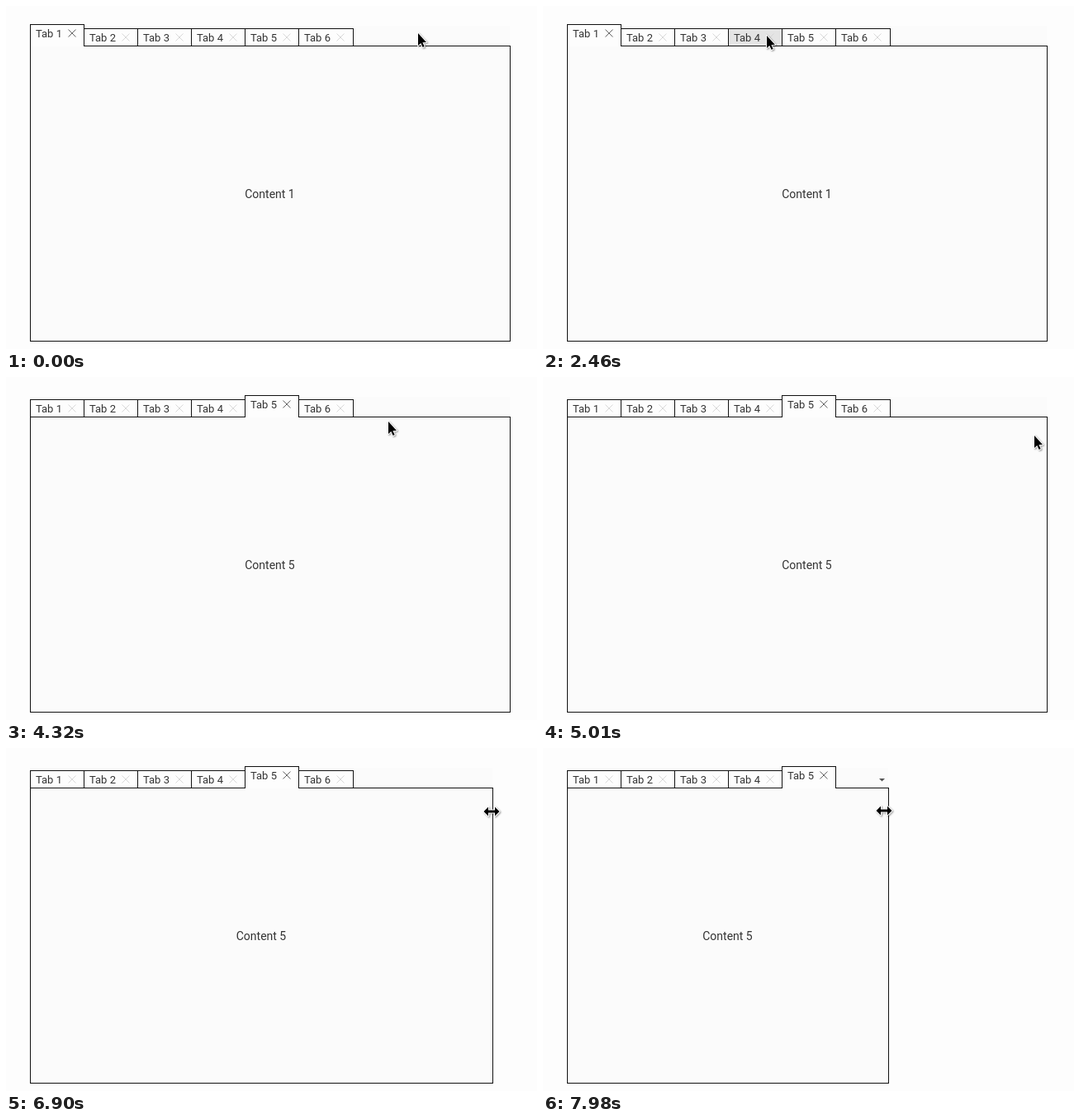
An HTML page with a canvas for the animation above (8000 ms loop, 643 px wide and 416 px high).

```html
<!DOCTYPE html>
<html lang="en">
<head>
<meta charset="utf-8">
<title>Tabs</title>
<style>
  html, body { margin: 0; width: 100%; height: 100%; overflow: hidden; background: #fdfdfd; }
  canvas { display: block; width: 643px; height: 416px; }
</style>
</head>
<body>
<canvas id="stage" width="643" height="416"></canvas>
<script>
const ctx = document.getElementById('stage').getContext('2d');
const LOOP = 8000, CLICK = 3150, RAISE = 200, GRAB = 6000, DRAG = 6510, LAG = 38;
const LEFT = 29, TAB_TOP = 27, TOP = 48, BOTTOM = 406, PITCH = 65.17, TABS = 6;
const PAGE = '#fdfdfd', PANEL = '#fbfbfb', LINE = '#111', HOVER = '#e4e4e4', TEXT = '#333';

const clamp = v => Math.max(0, Math.min(1, v));
const smooth = v => v * v * (3 - 2 * v);
const power = p => v => v ** p;
const tabX = i => Math.floor(LEFT + i * PITCH);

// Pointer strokes from the start point; it rests in between
const start = { x: 499, y: 34 };
const strokes = [
  { from: 150, to: 2220, x: 270, y: 37, ease: power(1.4) },
  { from: 2430, to: 2880, x: 324, y: 36, ease: smooth },
  { from: 3420, to: 5250, x: 608, y: 74, ease: smooth },
  { from: 5550, to: 5700, x: 610, y: 75, ease: smooth },
  { from: 5910, to: 6060, x: 613, y: 77, ease: smooth },
  { from: DRAG, to: LOOP, x: 409, y: 76, ease: power(1.57) }
];

function pointerAt(t) {
  let { x, y } = start;
  for (const s of strokes) {
    const k = s.ease(clamp((t - s.from) / (s.to - s.from)));
    x += (s.x - x) * k;
    y += (s.y - y) * k;
  }
  return { x, y };
}

function rect(x, y, w, h, color) {
  ctx.fillStyle = color;
  ctx.fillRect(x, y, w, h);
}

function poly(points, dx, dy) {
  ctx.beginPath();
  points.forEach(([x, y]) => ctx.lineTo(x + dx, y + dy));
  ctx.closePath();
}

function label(text, x, y, size, align) {
  ctx.font = size + 'px Roboto, sans-serif';
  ctx.textAlign = align;
  ctx.fillStyle = TEXT;
  ctx.fillText(text, x, y);
}

function cross(x, y, color) {
  const r = 4.5;
  ctx.beginPath();
  ctx.moveTo(x - r, y - r);
  ctx.lineTo(x + r, y + r);
  ctx.moveTo(x + r, y - r);
  ctx.lineTo(x - r, y + r);
  ctx.strokeStyle = color;
  ctx.lineWidth = 0.9;
  ctx.stroke();
}

function drawTab(i, lift, active, hovered) {
  const x = tabX(i), w = tabX(i + 1) - x, rise = 5 * lift, y = TAB_TOP - rise;
  const h = TOP + 1 - y;
  rect(x, y, w + 1, active ? h : h - 1, hovered && !active ? HOVER : PAGE);
  rect(x, y, w + 1, 1, LINE);
  rect(x, y, 1, h, LINE);
  rect(x + w, y, 1, h, LINE);
  label('Tab ' + (i + 1), x + 7, 43 - rise, 13, 'left');
  cross(x + 51, 38 - rise, active ? '#555' : '#d4d4d4');
}

function drawPointer(points, x, y) {
  ctx.save();
  ctx.lineJoin = 'round';
  poly(points, x, y);
  ctx.shadowColor = 'rgba(0,0,0,.4)';
  ctx.shadowBlur = 2;
  ctx.shadowOffsetX = ctx.shadowOffsetY = 1;
  ctx.strokeStyle = '#fff';
  ctx.lineWidth = 2;
  ctx.stroke();
  ctx.shadowColor = 'transparent';
  ctx.fillStyle = '#000';
  ctx.fill();
  ctx.restore();
}

const arrow = [[0, -1], [0, 14], [3.3, 11], [5.6, 16], [7.7, 15], [5.4, 10.2], [10, 10]];
const half = [[-9.5, 0], [-4, -5.5], [-4, -1.5], [4, -1.5], [4, -5.5]];
const resize = half.concat(half.map(([x, y]) => [-x, -y]));

function draw(t) {
  const { x, y } = pointerAt(t);
  const right = Math.round(pointerAt(Math.max(DRAG, t - LAG)).x) - 3;
  const active = t < CLICK ? 0 : 4;
  const lift = smooth(clamp((t - CLICK) / RAISE));
  const overflow = right < tabX(TABS);
  const count = overflow ? TABS - 1 : TABS;

  rect(0, 0, 643, 416, PAGE);
  rect(LEFT, 24, right - LEFT, BOTTOM - 24, PANEL);
  ctx.strokeStyle = LINE;
  ctx.lineWidth = 1;
  ctx.strokeRect(LEFT + 0.5, TOP + 0.5, right - LEFT, BOTTOM - TOP);

  const order = [...Array(count).keys()].filter(i => i !== active).concat(active);
  for (const i of order) {
    const hovered = y >= TAB_TOP && y < TOP && x >= tabX(i) && x < tabX(i + 1);
    drawTab(i, i === 0 ? 1 - lift : i === 4 ? lift : 0, i === active, hovered);
  }

  if (overflow) {
    poly([[-3.5, -1.5], [3.5, -1.5], [0, 2]], right - 7.5, 38.5);
    ctx.fillStyle = '#555';
    ctx.fill();
  }
  label('Content ' + (active + 1), (LEFT + right) / 2, 233, 14, 'center');
  drawPointer(t < GRAB ? arrow : resize, Math.round(x), Math.round(y));
}

function tick() {
  draw(performance.now() % LOOP);
  requestAnimationFrame(tick);
}
tick();
</script>
</body>
</html>
```
